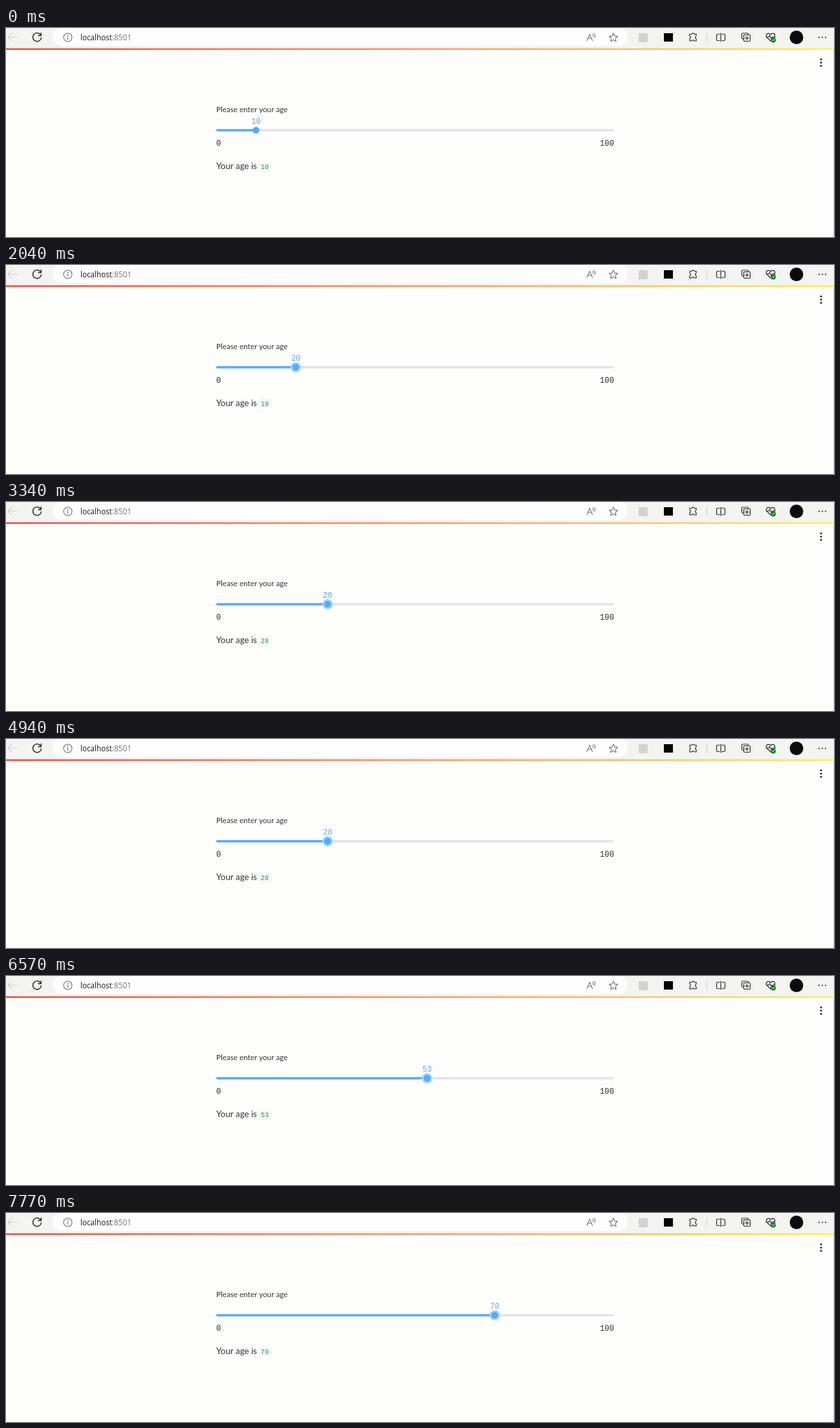
Recreate the animation shown at these times as an HTML page with a canvas. Size 1280x323 px, loop 8 s.

```html
<!DOCTYPE html>
<html lang="en">
<head>
<meta charset="utf-8">
<title>Age slider</title>
<style>
  html, body { margin: 0; width: 100%; height: 100%; overflow: hidden; background: #fdfdfc; }
  canvas { display: block; }
</style>
</head>
<body>
<canvas id="stage" width="1280" height="323"></canvas>
<script>
const ctx = document.getElementById('stage').getContext('2d');
const LOOP = 8000;
const TRACK = { left: 325, right: 940, y: 158 };
const INK = '#303134', BLUE = '#55acfa', ICON = '#292929';
const SANS = 'Lato, sans-serif', MONO = '"Liberation Mono", monospace';

const DRAGS = [
  { start: 1240, end: 1870, from: 10, to: 20 },
  { start: 2040, end: 2800, from: 20, to: 28 },
  { start: 5270, end: 5900, from: 28, to: 53 },
  { start: 6870, end: 7500, from: 53, to: 70 },
];
const RESULTS = [[0, 10], [3100, 28], [6200, 53], [7640, 70]];
const FOCUS_AT = 1100;

function sliderValue(t) {
  const drag = DRAGS.findLast(d => t >= d.start);
  if (!drag) return 10;
  const p = Math.min(1, (t - drag.start) / (drag.end - drag.start));
  const eased = p * p * (3 - 2 * p);
  return Math.round(drag.from + (drag.to - drag.from) * eased);
}

function text(str, x, y, font, color, align = 'left') {
  ctx.font = font;
  ctx.fillStyle = color;
  ctx.textAlign = align;
  ctx.fillText(str, x, y);
}

function box(x, y, w, h, r, color) {
  ctx.fillStyle = color;
  ctx.beginPath();
  ctx.roundRect(x, y, w, h, r);
  ctx.fill();
}

function dot(x, y, r, color) {
  ctx.fillStyle = color;
  ctx.beginPath();
  ctx.arc(x, y, r, 0, Math.PI * 2);
  ctx.fill();
}

function stroke(path, x = 0, y = 0, color = ICON, width = 1.2) {
  ctx.save();
  ctx.translate(x, y);
  ctx.strokeStyle = color;
  ctx.lineWidth = width;
  ctx.lineCap = ctx.lineJoin = 'round';
  ctx.stroke(new Path2D(path));
  ctx.restore();
}

function starPath(outer, inner) {
  const points = Array.from({ length: 10 }, (_, i) => {
    const r = i % 2 ? inner : outer, a = -Math.PI / 2 + i * Math.PI / 5;
    return `${r * Math.cos(a)} ${r * Math.sin(a)}`;
  });
  return `M${points.join('L')}Z`;
}

function drawToolbar() {
  box(0, 0, 1280, 32, 0, '#f3f3f2');
  box(72, 0, 889, 28, [12, 12, 14, 14], '#fdfdfd');

  stroke('M7 0H-7M-1.5 -5.5L-7 0L-1.5 5.5', 10, 14, '#cfcfcf');
  stroke('M6 -2.5A6.5 6.5 0 1 0 6.5 1M6.3 -6.5V-2.3H2', 48, 14, ICON, 1.4);
  stroke('M-6.5 0A6.5 6.5 0 1 1 6.5 0A6.5 6.5 0 1 1 -6.5 0M0 -.7V3.3', 95.5, 14.5, '#6d6d6d', 1.1);
  dot(95.5, 11.5, .9, '#6d6d6d');

  const urlFont = '11.7px "Open Sans", sans-serif';
  text('localhost', 115, 19, urlFont, '#1d1d1d');
  text(':8501', 115 + ctx.measureText('localhost').width, 19, urlFont, '#747474');

  // Read aloud and favourite
  stroke('M-6 5L-1.7 -5L2.6 5M-4.4 1.5H1M3 -5.2Q4.7 -3.2 3.4 -1M5.2 -6.5Q8 -3 5.6 .3', 904, 14.5, '#747474', 1.1);
  stroke(starPath(7, 3.3), 939, 15, '#747474', 1.1);

  box(978, 8, 14, 14, 1, '#d2d2ce');
  box(1017, 8, 14, 13, 0, '#050505');

  // Extensions, split view, collections
  stroke('M-5 -5H-2A2.2 2.2 0 0 1 2 -5H5V-2A2.1 2.1 0 0 0 5 2V5.5H2A2.2 2.2 0 0 0 -2 5.5H-5V2A2.1 2.1 0 0 0 -5 -2Z', 1062, 14.5);
  stroke('M0 -6V6', 1083.5, 14.5, '#c9c9c9', 1);
  stroke('M-2 -5H-5Q-6.5 -5 -6.5 -3.5V3.5Q-6.5 5 -5 5H-2M2 -5H5Q6.5 -5 6.5 -3.5V3.5Q6.5 5 5 5H2M0 -6.5V6.5', 1105, 14.5);
  stroke('M-4 3H-5Q-6.5 3 -6.5 1.5V-4.5Q-6.5 -6 -5 -6H2Q3.5 -6 3.5 -4.5M-2.5 -3.5H5Q6.5 -3.5 6.5 -2V5Q6.5 6.5 5 6.5H-2Q-3.5 6.5 -3.5 5V-2.5Q-3.5 -3.5 -2.5 -3.5M1.5 -1.2V4.2M-1.2 1.5H4.2', 1144, 14);

  // Heart with a status badge
  stroke('M0 6L-5.5 .5C-9 -3 -4 -8.5 0 -4C4 -8.5 9 -3 5.5 .5ZM-7 0H-3L-1.5 -2.5L1 2L2.2 0H7', 1182, 14);
  dot(1186, 18.5, 4, '#168522');
  stroke('M-1.8 0L-.5 1.3L1.8 -1.2', 1186, 18.5, '#fff', 1);

  dot(1222, 14.5, 10.5, '#0a0b0c');
  for (const dx of [-5, 0, 5]) dot(1262 + dx, 14.5, 1.1, ICON);
}

function drawPage() {
  box(0, 32, 1280, 291, 0, '#fdfdfc');
  const rainbow = ctx.createLinearGradient(0, 0, 1280, 0);
  rainbow.addColorStop(0, '#f4564f');
  rainbow.addColorStop(.5, '#f9a073');
  rainbow.addColorStop(.75, '#fbc66f');
  rainbow.addColorStop(1, '#fbf35c');
  box(0, 31.3, 1280, 2.7, 0, rainbow);
  box(1279, 34, 1, 289, 0, '#d5d5d5');
  for (const dy of [-5, 0, 5]) dot(1260, 53.5 + dy, 1.6, INK);
  text('Please enter your age', 325, 130, `11.7px ${SANS}`, INK);
  text('0', 325, 182, `12.2px ${MONO}`, INK);
  text('100', TRACK.right, 182, `12.2px ${MONO}`, INK, 'right');
  text('Your age is', 325, 217.5, `13.3px ${SANS}`, INK);
}

function drawSlider(value, focused) {
  const { left, right, y } = TRACK;
  const x = left + (right - left) * value / 100;
  box(left, y - 1.7, right - left, 3.4, 1.7, '#e1e3ee');
  box(left, y - 1.7, x - left, 3.4, 1.7, BLUE);
  if (focused) dot(x, y, 8, '#a9d4fb');
  dot(x, y, 5.3, BLUE);
  text(value, x, 148, `12.2px ${MONO}`, '#62a9ee', 'center');
}

function drawResult(age) {
  box(390, 206, 21, 16, 3, '#f7f9f7');
  text(age, 400, 218, `10.5px ${MONO}`, '#259b3f', 'center');
}

function render(now) {
  const t = now % LOOP;
  drawToolbar();
  drawPage();
  drawSlider(sliderValue(t), t >= FOCUS_AT);
  drawResult(RESULTS.findLast(([at]) => t >= at)[1]);
}

const began = performance.now();
function tick() {
  render(performance.now() - began);
  requestAnimationFrame(tick);
}
tick();
</script>
</body>
</html>
```
